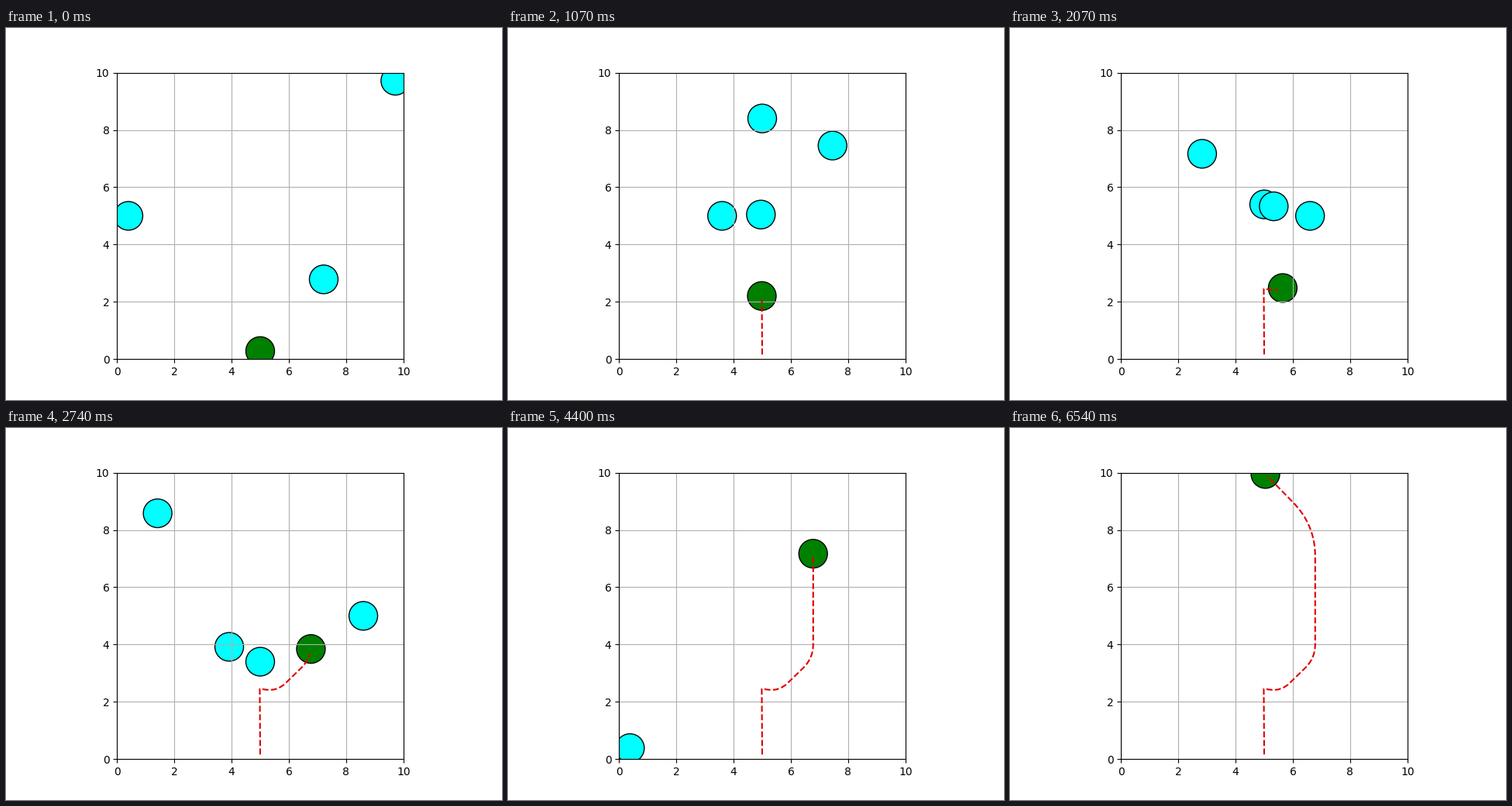
Recreate the animation shown at these times as a matplotlib script. Size 640 by 480 pixels, loop 6.61 s.

```python
import numpy as np
import matplotlib.pyplot as plt
from matplotlib.animation import FuncAnimation
from matplotlib.patches import Circle

LOOP_MS = 6610
STEP_RATE = 15 / 1000      # simulation steps per ms
STEPS = 99
FRAMES = 3 * STEPS         # finer than the steps, to hit their start times
TICK = LOOP_MS / FRAMES

RADIUS = 0.5
SPEED = 0.2
DIAG = SPEED / np.sqrt(2)

# Obstacles: start x, start y, step x, step y
OBSTACLES = [
    (0, 5, SPEED, 0),
    (5, 12, 0, -SPEED),
    (10, 10, -DIAG, -DIAG),
    (7.5, 2.5, -DIAG, DIAG),
]

# Robot route: x, y, rounding of the corner
ROUTE = [
    (5, 0.16, 0), (4.985, 2.455, 0), (5.591, 2.364, 0.4),
    (6.78, 3.52, 0.48), (6.78, 8.17, 1.1), (5.04, 9.954, 0),
]
# Distance covered by step: drive up, wait for the traffic, then slow down
KEY_STEPS = [-1, 18.1, 25, 28, 31, 41, 55, 79, 98]
KEY_DIST = [0, 2.295, 2.295, 2.465, 2.969, 4.785, 6.775, 9.69, 11.494]


def toward(a, b, dist):
    return a + (b - a) * dist / np.hypot(*(b - a))


def rounded(route):
    """Polyline through the route with its corners eased by quadratic curves."""
    pts = np.array(route)[:, :2]
    u = np.linspace(0, 1, 40)[:, None]
    parts = [pts[:1]]
    for prev, corner, nxt, (_, _, trim) in zip(pts, pts[1:], pts[2:], route[1:]):
        if trim:
            a, b = toward(corner, prev, trim), toward(corner, nxt, trim)
            parts.append((1 - u) ** 2 * a + 2 * u * (1 - u) * corner + u ** 2 * b)
        else:
            parts.append(corner[None])
    return np.vstack(parts + [pts[-1:]])


path = rounded(ROUTE)
length = np.concatenate(([0], np.cumsum(np.hypot(*np.diff(path, axis=0).T))))
dist = np.interp(np.arange(-1, STEPS), KEY_STEPS, KEY_DIST)
xs = np.interp(dist, length, path[:, 0])
ys = np.interp(dist, length, path[:, 1])

fig, ax = plt.subplots(figsize=(6.4, 4.8), dpi=100)
ax.set_aspect("equal")
ax.set_xlim(0, 10)
ax.set_ylim(0, 10)
ax.grid(True)


def add_disc(color):
    return ax.add_patch(Circle((0, 0), RADIUS, facecolor=color, edgecolor="black"))


robot = add_disc("green")
discs = [add_disc("cyan") for _ in OBSTACLES]
trail, = ax.plot([], [], "--", color="#e00000")


def update(frame):
    n = min(int((frame + 1) * TICK * STEP_RATE), STEPS - 1)
    robot.center = xs[n + 1], ys[n + 1]
    for disc, (x, y, dx, dy) in zip(discs, OBSTACLES):
        disc.center = x + dx * (n + 2), y + dy * (n + 2)
    trail.set_data(xs[:n + 1], ys[:n + 1])
    return [robot, trail, *discs]


anim = FuncAnimation(fig, update, frames=FRAMES, interval=TICK,
                     repeat=True, repeat_delay=0, blit=False)
plt.show()
```
